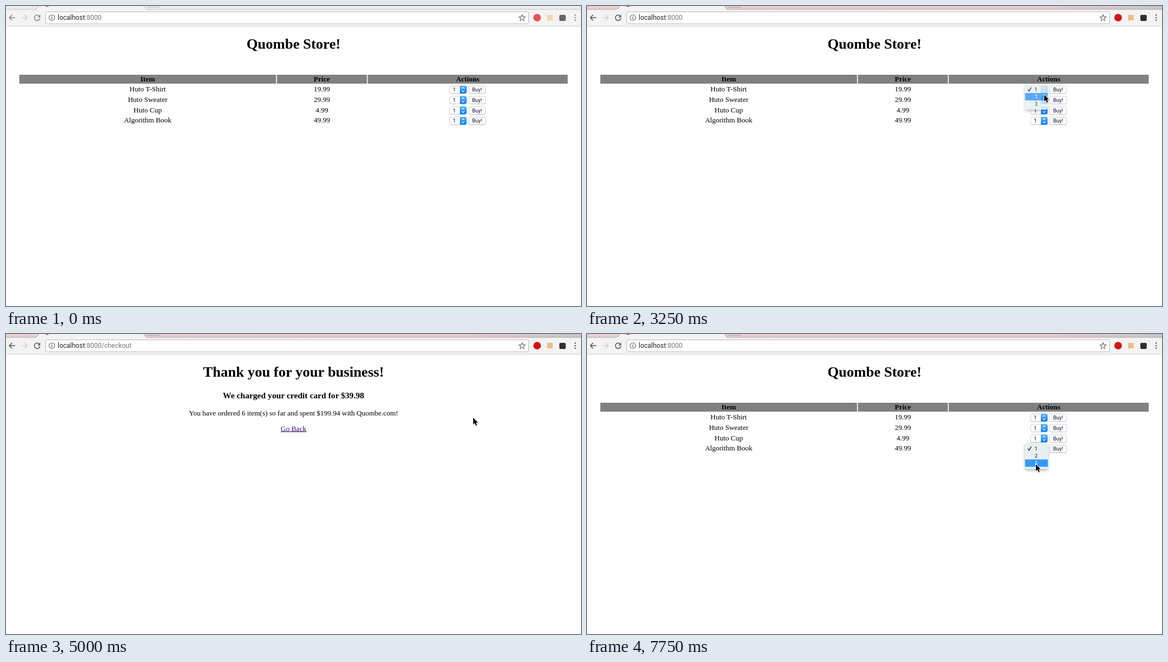
Recreate the animation shown at these times as an HTML page. Size 1035x541 px, loop 8000 ms.

```html
<!DOCTYPE html>
<html lang="en">
<head>
<meta charset="utf-8">
<title>Store checkout</title>
<style>
html, body { margin: 0; width: 100%; height: 100%; overflow: hidden; background: #fff; }
svg { display: block; width: 100%; height: 100%; }
text { white-space: pre; }
.page { font: 13px "Liberation Serif", "Times New Roman", serif; text-anchor: middle; }
.bold { font-weight: bold; }
.h1 { font-size: 26px; font-weight: bold; }
.h3 { font-size: 15.2px; font-weight: bold; }
.ui { font: 9.5px Roboto, "Open Sans", sans-serif; text-anchor: middle; }
.url { font: 12px Roboto, "Open Sans", sans-serif; }
.status { font: 9.5px Roboto, "Open Sans", sans-serif; }
.line { fill: none; stroke-width: 1.5; }
</style>
</head>
<body>
<svg id="stage" viewBox="0 0 1035 541" preserveAspectRatio="none">
  <defs>
    <linearGradient id="blue" x2="0" y2="1">
      <stop stop-color="#5bb3fb"/><stop offset="1" stop-color="#0878f2"/>
    </linearGradient>
    <linearGradient id="strip">
      <stop stop-color="#ebd0ce"/><stop offset=".8" stop-color="#e4cac9"/><stop offset="1" stop-color="#c9c6c6"/>
    </linearGradient>
    <filter id="soft" x="-40%" y="-40%" width="180%" height="180%">
      <feDropShadow dx="0" dy="2.5" stdDeviation="2.5" flood-opacity=".32"/>
    </filter>
    <filter id="tipShadow" x="-50%" y="-30%" width="200%" height="180%">
      <feDropShadow dx="0" dy="1" stdDeviation=".7" flood-opacity=".3"/>
    </filter>
  </defs>
  <rect width="1035" height="541" fill="#fff"/>
  <g id="chrome"></g>
  <g id="store"></g>
  <g id="thanks"></g>
  <g id="status">
    <path d="M0 527.5H341.5Q343.5 527.5 343.5 529.5V541H0Z" fill="#f2f2f2" stroke="#bdbdbd"/>
    <text id="statusText" class="status" x="0" y="538" fill="#222"></text>
  </g>
  <g id="menu"></g>
  <path id="cursor" d="M0 0V12L2.8 9.4L4.8 14L6.8 13.1L4.9 8.7H8.6Z"
    stroke="#fff" stroke-width="1.6" paint-order="stroke" filter="url(#tipShadow)"/>
</svg>
<script>
const $ = id => document.getElementById(id);
const LOOP = 8000, STEP = 250, CENTER = 517.5;

const items = [
  ["Huto T-Shirt", "19.99"], ["Huto Sweater", "29.99"],
  ["Huto Cup", "4.99"], ["Algorithm Book", "49.99"]
];

// Time, x, y of the pointer tip
const path = [
  [250, 219, 174], [500, 420, 172], [750, 660, 169], [1000, 802, 165],
  [1250, 820, 162], [1500, 821, 160], [1750, 822, 154], [2500, 822, 152],
  [2750, 823, 157], [3000, 823, 160], [3500, 823, 160], [3750, 839, 154],
  [4000, 841, 151], [5000, 841, 151], [5250, 720, 160], [5500, 560, 171],
  [5750, 508, 170], [6000, 508, 170], [6250, 560, 177], [6500, 826, 207],
  [7000, 826, 207], [7250, 812, 219], [7500, 808, 233], [7750, 808, 235]
];

const text = (x, y, s, cls, extra = "") => `<text x="${x}" y="${y}" class="${cls}" ${extra}>${s}</text>`;
const rect = (x, y, w, h, fill, extra = "") =>
  `<rect x="${x}" y="${y}" width="${w}" height="${h}" fill="${fill}" ${extra}/>`;
const rowY = i => 150.8 + 18.75 * i;

function control(x, y, w) {
  return rect(x + .5, y - 6.2, w, 14, "#d2d2d2", 'rx="3"') +
    rect(x + .5, y - 6.6, w, 13.4, "#fff", 'rx="3" stroke="#c6c6c6" stroke-width=".8"');
}

function drawStore(qty) {
  const cells = [[24, 462, 255, "Item"], [487.6, 162, 568.5, "Price"], [651.2, 359.8, 831, "Actions"]];
  let out = text(CENTER, 77, "Quombe Store!", "page h1");
  for (const [x, w, mid, label] of cells)
    out += rect(x, 124, w, 16, "#808080") + text(mid, 136, label, "page bold");
  items.forEach(([name, price], i) => {
    const y = rowY(i);
    out += text(255, y + 3.4, name, "page") + text(568.5, y + 3.4, price, "page");
    out += control(798, y, 30.5) + text(807, y + 3.4, i ? 1 : qty, "ui");
    out += `<path d="M817 ${y - 7}h9q3 0 3 3v8q0 3-3 3h-9z" fill="url(#blue)"/>`;
    out += `<path d="M820.6 ${y - 1.6}l2.2-2.3 2.2 2.3m-4.4 3.2l2.2 2.3 2.2-2.3" class="line" stroke="#fff" style="stroke-width:1.1"/>`;
    out += control(832.5, y, 30.5) + text(848, y + 3.4, "Buy!", "ui", 'fill="#0b0b38"');
  });
  return out;
}

function drawThanks() {
  return text(CENTER, 77, "Thank you for your business!", "page h1") +
    text(CENTER, 116, "We charged your credit card for $39.98", "page h3") +
    text(CENTER, 147, "You have ordered 6 item(s) so far and spent $199.94 with Quombe.com!", "page") +
    text(CENTER, 174.5, "Go Back", "page", 'fill="#3f1670" text-decoration="underline"');
}

function drawChrome(focused, loading, checkout) {
  const ink = focused ? "#555" : "#888", edge = focused ? "#aaa3a3" : "#c2c2c2";
  const star = Array.from({ length: 10 }, (_, i) => {
    const r = i % 2 ? 2.6 : 5.8, a = (i / 5 - .5) * Math.PI;
    return `${929 + r * Math.cos(a)},${21.5 + r * Math.sin(a)}`;
  }).join(" ");
  const icon = loading
    ? `<path d="M51.5 16.5l9 9m0-9l-9 9" class="line" stroke="${ink}"/>`
    : `<path d="M59.8 17.8A5 5 0 1 0 61 22" class="line" stroke="${ink}"/><path d="M61.6 15.4v5h-5z" fill="${ink}"/>`;
  const dots = [16.5, 21, 25.5].map(y => `<circle cx="1024.5" cy="${y}" r="1.25" fill="${ink}"/>`).join("");
  const badge = loading
    ? (checkout === "pending" ? '<path d="M73 1.5Q77 1.5 81 0H76Z" fill="#3a82d8"/>' : "")
    : `<path d="M70.5 0Q74 3 77.5 0Z" fill="${focused ? "#e02626" : "#e64a4a"}"/>`;
  return rect(0, 0, 1035, 36.5, "#f3f3f3") +
    rect(0, 0, 1035, 6, focused ? "url(#strip)" : "#eeeded") +
    `<path d="M54 6.5Q57 5 58.5 0H248Q250 5 253 6.5Z" fill="#f3f3f3"/>` +
    `<path d="M0 6H53Q56.5 5 58.5 0M248 0Q250 5 253.5 6H1035" fill="none" stroke="${edge}"/>` +
    `<path d="M253 0Q254.5 2.5 257 2.5H274Q276.5 2.5 276 0" fill="${focused ? "#d8cfce" : "#e2e2e2"}" stroke="${edge}"/>` +
    badge +
    rect(0, 36, 1035, 1, "#d3d3d3") +
    `<path d="M16.5 21H6m5-5l-5 5 5 5" class="line" stroke="${ink}"/>` +
    `<path d="M28 21h10.5m-5-5l5 5-5 5" class="line" stroke="#d2d2d2"/>` + icon +
    rect(71.5, 10.5, 869, 21.5, "#fff", 'rx="2" stroke="#b9b9b9"') +
    `<circle cx="82.5" cy="21" r="5" fill="none" stroke="#666" stroke-width="1.1"/>` +
    rect(81.9, 20, 1.3, 3.8, "#555") + rect(81.9, 17.8, 1.3, 1.3, "#555") +
    text(93, 25.2, `localhost<tspan fill="#777">:8000${checkout ? "/checkout" : ""}</tspan>`, "url", 'fill="#222"') +
    `<polygon points="${star}" fill="none" stroke="#666" stroke-width="1.1"/>` +
    `<circle cx="956" cy="21" r="6.8" fill="${focused ? "#d41212" : "#e35252"}"/>` +
    rect(974, 16, 10, 10, focused ? "#edbd8a" : "#f3d3b2") +
    rect(996, 16, 11.5, 11, focused ? "#303030" : "#666", 'rx="2"') + dots;
}

function drawMenu(row, picked) {
  const top = rowY(row) - 10.8;
  let out = rect(788.5, top, 41, 47, "#e7f0ef", 'rx="4" filter="url(#soft)"');
  out += rect(788.5, top + 17 + 13 * (picked - 2), 41, 13.2, "#3497f8");
  for (let n = 1; n <= 3; n++)
    out += text(808.5, top + 13.5 + 13 * (n - 1), n, "ui", `fill="${n === picked ? "#fff" : "#222"}"`);
  return out + `<path d="M793.5 ${top + 10.5}l2.2 3 4-6.5" class="line" stroke="${picked === 1 ? "#fff" : "#333"}"/>`;
}

function pointer(t) {
  const i = path.findIndex(p => p[0] >= t);
  const b = path[i], a = path[Math.max(0, i - 1)];
  const k = b[0] === a[0] ? 0 : (t - a[0]) / (b[0] - a[0]);
  return [a[1] + (b[1] - a[1]) * k, a[2] + (b[2] - a[2]) * k];
}

const show = (id, on) => $(id).setAttribute("visibility", on ? "visible" : "hidden");
const within = (t, a, b) => t >= a && t < b;

function render(t) {
  const thanks = within(t, 4750, 6250);
  const connecting = within(t, 4500, 4750);
  const loading = connecting || within(t, 6000, 6250);
  const checkout = connecting ? "pending" : thanks;
  $("chrome").innerHTML = drawChrome(t >= 2000, loading, checkout);
  $("store").innerHTML = drawStore(within(t, 3500, 4750) ? 2 : 1);
  show("store", !thanks);
  show("thanks", thanks);

  show("status", connecting || within(t, 5750, 6500));
  $("statusText").textContent = connecting ? "Connecting..." : "localhost:8000";

  const first = within(t, 2250, 3500), last = t >= 7000;
  const picked = first ? (t < 2750 ? 1 : 2) : Math.min(3, 1 + Math.floor((t - 7000) / STEP));
  $("menu").innerHTML = first ? drawMenu(0, picked) : last ? drawMenu(3, picked) : "";
  $("menu").setAttribute("opacity", within(t, 3250, 3500) ? .8 : 1);

  show("cursor", t >= 250);
  if (t >= 250) $("cursor").setAttribute("transform", `translate(${pointer(t)})`);
}

$("thanks").innerHTML = drawThanks();
const start = performance.now();
let shown = -1;
function tick() {
  const elapsed = (performance.now() - start) % LOOP;
  const t = Math.floor(elapsed / STEP) * STEP;
  if (t !== shown) render(shown = t);
  requestAnimationFrame(tick);
}
tick();
</script>
</body>
</html>
```
